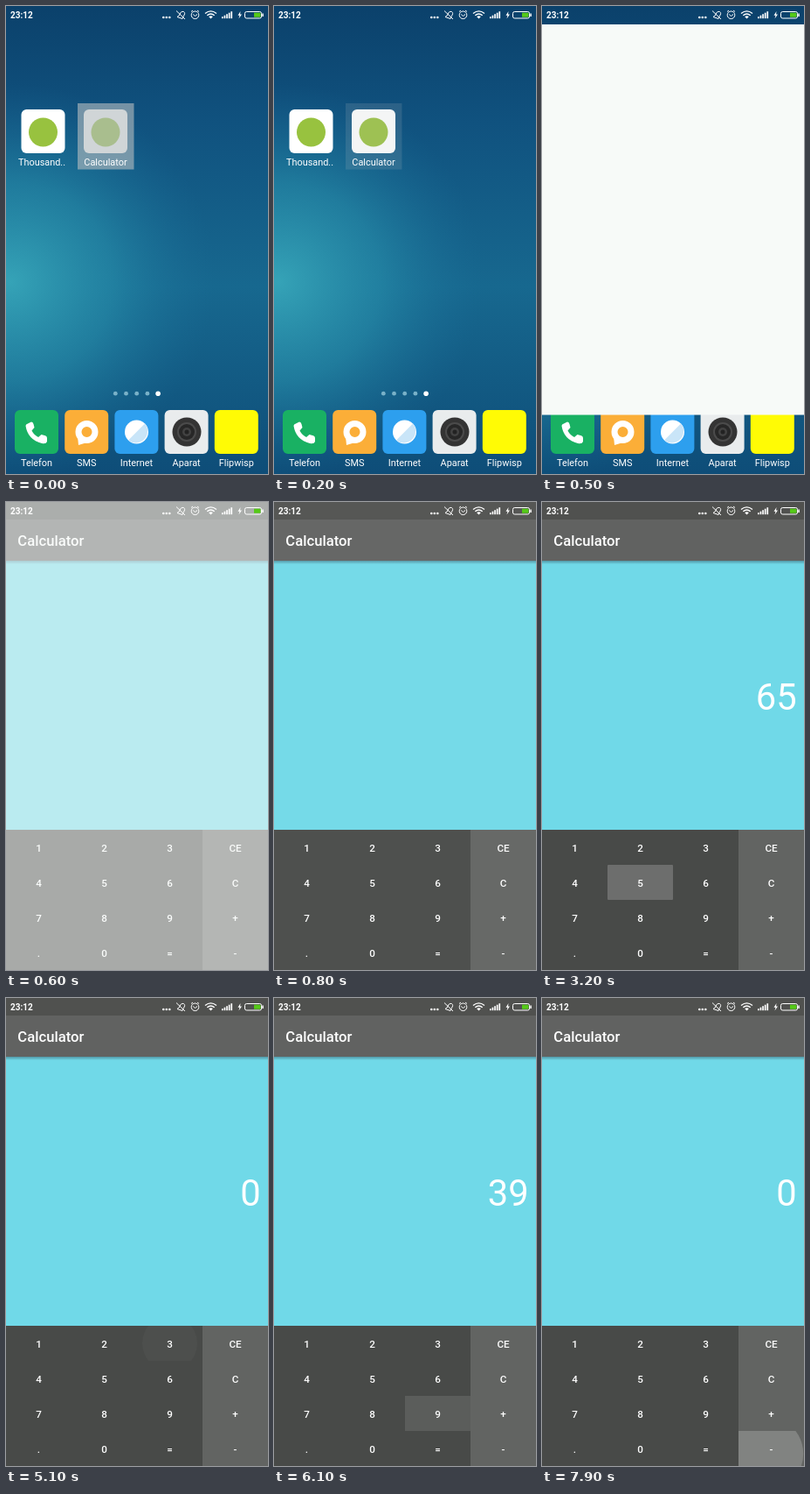
These frames come from a looping animation (300x534 px, 8000 ms). An HTML page:

```html
<!DOCTYPE html>
<html lang="pl">
<head>
<meta charset="utf-8">
<title>Calculator</title>
<style>
  html, body { margin: 0; width: 100%; height: 100%; overflow: hidden; background: #0d4a75; }
  svg { display: block; width: 100%; height: 100%; font-family: Roboto, sans-serif; fill: #fff; }
  .label { font-size: 10.9px; text-anchor: middle; }
  .key { font-size: 11.67px; font-weight: 500; text-anchor: middle; }
  .line { fill: none; stroke: #fff; }
</style>
</head>
<body>
<svg id="stage" viewBox="0 0 300 534">
  <defs>
    <linearGradient id="sky" x1="0" y1="0" x2="0" y2="1">
      <stop offset="0" stop-color="#0b416b"/>
      <stop offset=".25" stop-color="#10527f"/>
      <stop offset=".6" stop-color="#17688f"/>
      <stop offset="1" stop-color="#0e4d78"/>
    </linearGradient>
    <radialGradient id="glow" gradientUnits="userSpaceOnUse" cx="0" cy="0" r="1"
      gradientTransform="translate(5 315) rotate(-14) scale(235 225)">
      <stop offset="0" stop-color="#37a6b9" stop-opacity=".95"/>
      <stop offset=".5" stop-color="#2890ac" stop-opacity=".6"/>
      <stop offset="1" stop-color="#1a6f99" stop-opacity="0"/>
    </radialGradient>
    <linearGradient id="shade" x1="0" y1="0" x2="0" y2="1">
      <stop offset="0" stop-color="#234" stop-opacity=".5"/>
      <stop offset="1" stop-color="#234" stop-opacity="0"/>
    </linearGradient>
    <clipPath id="cell"><rect id="cellBox" width="75" height="40"/></clipPath>
  </defs>

  <g id="home">
    <rect width="300" height="534" fill="url(#sky)"/>
    <rect width="300" height="534" fill="url(#glow)"/>
    <g id="apps"></g>
    <g id="dots"></g>
    <g id="dock"></g>
  </g>

  <rect id="splash" fill="#f7faf8"/>

  <g id="calc">
    <rect y="66" width="300" height="308" fill="#70d9e8"/>
    <rect y="66" width="300" height="5" fill="url(#shade)"/>
    <rect width="300" height="20.5" fill="#50514f"/>
    <rect y="20" width="300" height="47" fill="#616261"/>
    <text x="13.3" y="50" font-size="16.67" font-weight="500">Calculator</text>
    <text id="display" x="291.7" y="237.3" font-size="41.67" text-anchor="end"></text>
    <rect y="374" width="225" height="160" fill="#484a48"/>
    <rect x="225" y="374" width="75" height="160" fill="#626462"/>
    <circle id="ripple" clip-path="url(#cell)"/>
    <g id="keys"></g>
  </g>

  <g id="status">
    <text x="5" y="14" font-size="10" font-weight="700">23:12</text>
    <g id="more"></g>
    <g class="line" stroke-width="1">
      <path d="M196 12.5 L199 10 Q200 5.5 203.5 6.5 Q206 8 203 12 L202 14.5 Z M195 5.5 L205 15"/>
      <circle cx="216.500" cy="10.300" r="4.300"/>
      <path d="M214.300 9.500 L216.500 11.500 L219 9.500 M212 6.500 L214 5 M219 5 L221 6.500"/>
      <path stroke-width="1.400" d="M228 8.500 Q234.500 3.200 241 8.500 M230.300 10.800 Q234.500 7.300 238.700 10.800"/>
      <rect x="273.500" y="6.500" width="19" height="7.500" rx="2"/>
    </g>
    <path d="M232.200 12.200 Q234.500 10.300 236.800 12.200 L234.500 14.500 Z"/>
    <g id="bars"></g>
    <path d="M268.500 6 L265.500 10.700 H267.500 L266.500 14.500 L270 9.500 H268 Z"/>
    <rect x="284" y="7.700" width="7.500" height="5" fill="#55c918"/>
    <rect x="293.300" y="8.500" width="1.500" height="3.500"/>
  </g>
</svg>
<script>
const LOOP = 8000;
const $ = id => document.getElementById(id);
const clamp = v => Math.max(0, Math.min(1, v));
const ramp = (t, a, b) => clamp((t - a) / (b - a));
const mix = (a, b, p) => a + (b - a) * p;
const set = (el, attrs) => { for (const k in attrs) el.setAttribute(k, attrs[k]); };

const tile = (x, y, fill) => `<rect x="${x}" y="${y}" width="50" height="50" rx="6" fill="${fill}"/>`;
const disc = (x, y, r, fill) => `<circle cx="${x}" cy="${y}" r="${r}" fill="${fill}"/>`;
const text = (x, y, s, cls) => `<text x="${x}" y="${y}" class="${cls}">${s}</text>`;

// Home screen
const app = x => tile(x, 118, '#fff') + disc(x + 25, 144, 16.5, '#98c23f');
$('apps').innerHTML = app(17.5) + app(89) +
  '<rect id="press" x="82" y="111" width="64.500" height="75.500" fill="#b4bcbe"/>' +
  text(41, 181.5, 'Thousand..', 'label') + text(114, 181.5, 'Calculator', 'label');

$('dots').innerHTML = [0, 1, 2, 3, 4].map(i =>
  disc(125.3 + i * 12.2, 442.2, i < 4 ? 2.4 : 2.8, i < 4 ? '#79b1c8' : '#fff')).join('');

const glyphs = [
  '<path d="M25 476.500 L29 474.500 Q31 474.500 31.500 477 L32.500 481 L29.500 484.500 Q32 489.500 37 492 L40.500 489 L45 490.300 Q47 491 47 493 V497 Q46 500 41 499 Q25 495 22.500 479 Q22.500 477 25 476.500 Z"/>',
  '<circle cx="92.500" cy="486" r="9.500" fill="none" stroke="#fff" stroke-width="7"/><path d="M82 491 L83 501 L93 498 Z"/>',
  disc(149.5, 486, 13.5, '#fff') + '<path d="M140 495.500 A13.500 13.500 0 0 0 159 476.500 Z" fill="#c9e5f8"/>',
  disc(207, 486, 16.5, '#343434') + disc(207, 486, 11, '#4b4b4b') +
    disc(207, 486, 9, '#272727') + disc(207, 486, 5, '#424242') + disc(207, 486, 2.5, '#222'),
  ''
];
const dock = [['Telefon', '#19b163'], ['SMS', '#fbae38'], ['Internet', '#2d9fee'],
  ['Aparat', '#e9eced'], ['Flipwisp', '#fffb05']];
$('dock').innerHTML = dock.map(([name, fill], i) => {
  const x = 10 + i * 57.2;
  return tile(x, 461, fill) + glyphs[i] + text(x + 25, 525, name, 'label');
}).join('');

// Status bar
$('more').innerHTML = [180.3, 183.8, 187.3].map(x => disc(x, 13, 1.3, '#fff')).join('');
$('bars').innerHTML = [2, 3.5, 5, 6.5, 8].map((h, i) =>
  `<rect x="${247 + i * 2.6}" y="${14.2 - h}" width="1.700" height="${h}"/>`).join('');

// Keypad
const keys = ['1', '2', '3', 'CE', '4', '5', '6', 'C', '7', '8', '9', '+', '.', '0', '=', '-'];
const corner = i => [(i % 4) * 75, 374 + Math.floor(i / 4) * 40];
$('keys').innerHTML = keys.map((k, i) => {
  const [x, y] = corner(i);
  return text(x + 37.5, y + 24.5, k, 'key');
}).join('');

// key, touch start, release, display after release
const taps = [
  ['6', 1450, 1540, '6'],
  ['5', 3101, 3180, '65'],
  ['+', 4010, 4070, '0'],
  ['3', 5088, 5250, '3'],
  ['9', 5690, 5890, '39'],
  ['=', 6490, 6620, '104'],
  ['-', 7795, 7880, '0']
];

function drawTaps(t) {
  let shown = '', alpha = 0;
  for (const [key, start, release, value] of taps) {
    if (t >= release) shown = value;
    if (t < start || t > release + 310) continue;
    const [x, y] = corner(keys.indexOf(key));
    const off = key === '-' ? 6 : 0;
    alpha = ramp(t, start, start + 90) * (1 - ramp(t, release + 120, release + 310));
    set($('cellBox'), { x, y });
    set($('ripple'), { cx: x + 37.5 - off, cy: y + 20 + off, r: 30 + 0.12 * (t - start) });
  }
  set($('ripple'), { opacity: 0.2 * alpha });
  if ($('display').textContent !== shown) $('display').textContent = shown;
}

// The window opens from the icon, sideways faster than downwards
function drawLaunch(t) {
  set($('press'), { opacity: 0.62 * (1 - ramp(t, 50, 250)) });
  const px = 1 - (1 - ramp(t, 220, 440)) ** 2;
  const py = 1 - (1 - ramp(t, 220, 580)) ** 1.08;
  const left = mix(82, 0, px), right = mix(146, 300, px);
  const top = mix(111, 21, px), bottom = mix(187, 534, py);
  const full = t >= 580;
  set($('splash'), {
    x: left, y: full ? 0 : top, width: right - left, height: bottom - (full ? 0 : top),
    opacity: ramp(t, 200, 320)
  });
  set($('calc'), { opacity: t < 580 ? 0 : mix(0.35, 1, 1 - (1 - ramp(t, 580, 900)) ** 2.4) });
}

function render(t) {
  drawLaunch(t);
  drawTaps(t);
}

const begin = performance.now();
function tick() {
  render((performance.now() - begin) % LOOP);
  requestAnimationFrame(tick);
}
tick();
</script>
</body>
</html>
```
